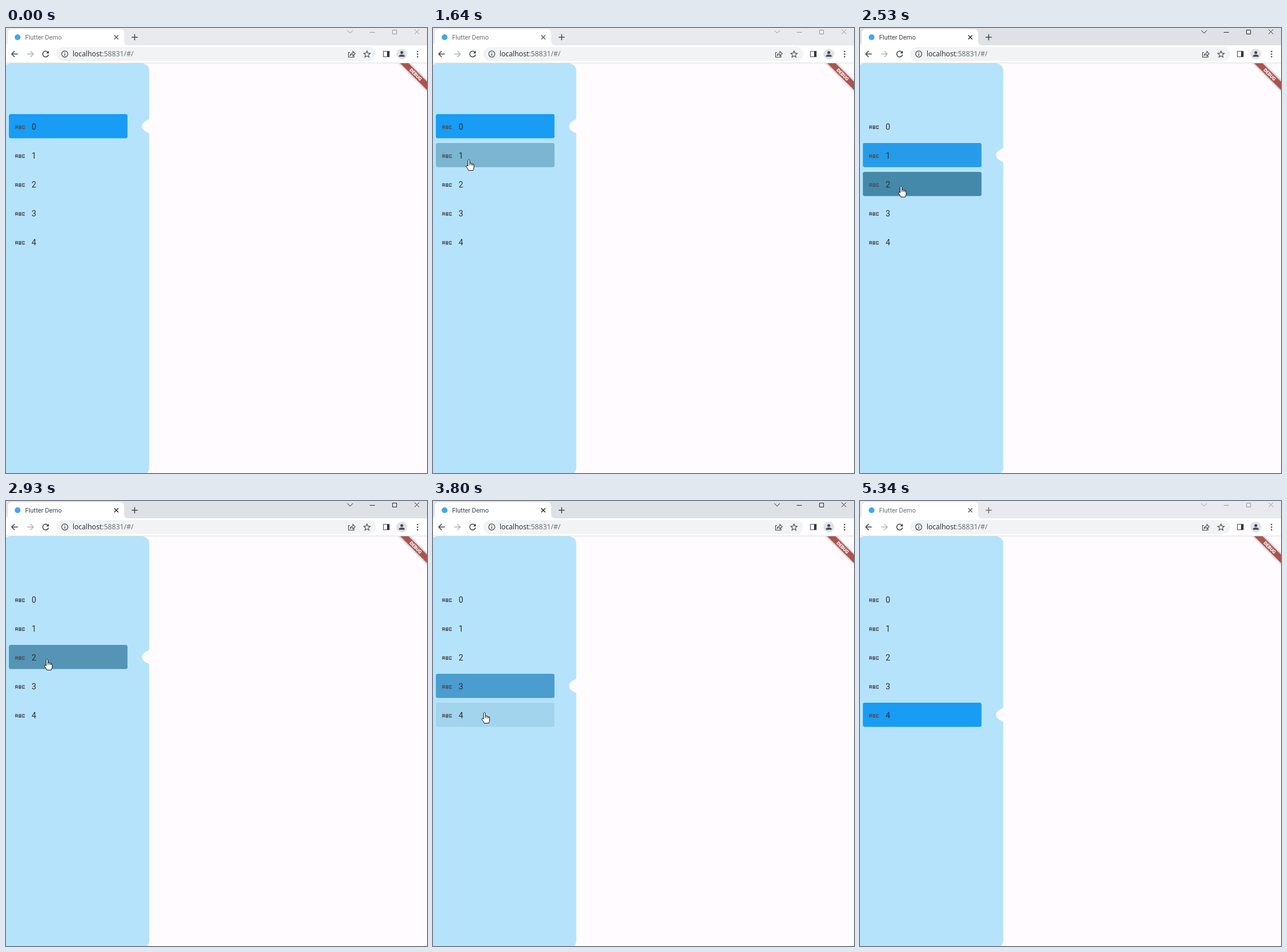
Animation of 727 by 770 pixels, one loop 5410 ms. Source, as an HTML page:

```html
<!DOCTYPE html>
<html lang="en">
<head>
<meta charset="utf-8">
<title>Sidebar demo</title>
<style>
  html, body { margin: 0; width: 100%; height: 100%; overflow: hidden; background: #fffbff; }
  svg { display: block; width: 727px; height: 770px; }
  .line { fill: none; stroke: #45494d; stroke-width: 1.5; }
  .title { font: 11px Roboto, sans-serif; }
  .url { font: 12.1px "Open Sans", sans-serif; fill: #62666b; }
  .digit { font: 14px Roboto, sans-serif; fill: #2c2c36; }
  .banner { font: 900 8.2px Roboto, sans-serif; fill: #fff; text-anchor: middle; }
</style>
</head>
<body>
<svg viewBox="0 0 727 770">
  <defs>
    <clipPath id="page"><rect y="61" width="727" height="709"/></clipPath>
    <filter id="shadow" x="-20%" y="-100%" width="140%" height="300%"><feGaussianBlur stdDeviation="2.2"/></filter>
    <g id="abc" fill="none" stroke="#50505a" stroke-width="1.35">
      <path d="M16.6 174.5V169.4H19.8V174.5M16.6 172.2H19.8"/>
      <path d="M22.6 169.4H25.8V174H22.6ZM22.6 171.8H25.8"/>
      <path d="M31.6 170.8V169.4H28.6V174H31.6V172.6"/>
    </g>
  </defs>

  <rect id="strip" width="727" height="31"/>
  <path d="M-4 30Q3 30 3 23V9Q3 2 10 2H197Q204 2 204 9V23Q204 30 211 30Z" fill="#fff"/>
  <circle cx="20" cy="16" r="5" fill="#42a5f5"/>
  <text id="title" class="title" x="33" y="20">Flutter Demo</text>
  <path id="tabClose" class="line" d="M187 12.5l7 7m0-7l-7 7"/>
  <path id="plus" class="line" d="M217 16h10.4M222.2 10.8v10.4"/>
  <path id="controls" class="line" style="stroke-width:1" d="M589.5 4.2l4.7 4.8 4.7-4.8M628 7.5h9M667.5 3.5h7v7h-7zM705.5 2.5l8 8m0-8l-8 8"/>

  <rect y="30" width="727" height="30" fill="#fff"/>
  <rect y="60" width="727" height="1" fill="#dcdde0"/>
  <rect x="87" y="33" width="552" height="24" rx="12" fill="#f1f3f4"/>
  <path class="line" d="M20.5 45H10M15 39.8L9.8 45L15 50.2"/>
  <path class="line" style="stroke:#bbb3b1" d="M36.5 45H47M42 39.8L47.2 45L42 50.2"/>
  <path class="line" d="M72.6 42.2A5 5 0 1 0 73.4 46"/>
  <path d="M74 39.2V44H69.2Z" fill="#45494d"/>
  <circle class="line" cx="101.5" cy="45" r="5.3" style="stroke-width:1.2"/>
  <path class="line" style="stroke-width:1.3" d="M101.5 44.3v3.8M101.5 41.7v1.4"/>
  <text class="url" x="115" y="49.4"><tspan fill="#222428">localhost</tspan>:58831/#/</text>
  <g class="line" style="stroke-width:1.1">
    <path d="M594 42.5h-2.5v8h9.5v-2.8M594.3 47.5q.5-4 4.7-4.3v-2.8l4 4-4 4v-2.7q-3 0-4.7 1.8z"/>
    <path d="M623.4 39.7l1.6 3.7 4 .4-3 2.7.9 4-3.5-2.1-3.5 2.1.9-4-3-2.7 4-.4z"/>
    <path d="M651.8 40.3h10v9.4h-10z"/>
  </g>
  <path d="M658 40h4v10h-4z" fill="#33373b"/>
  <circle cx="683.5" cy="45" r="9.3" fill="#dfe2e7"/>
  <circle cx="683.5" cy="42.5" r="2.5" fill="#444a55"/>
  <path d="M678.5 49.8v-1q0-2.7 5-2.7t5 2.7v1z" fill="#444a55"/>
  <path d="M710.7 40.7v9.1" fill="none" stroke="#45494d" stroke-width="2.6" stroke-linecap="round" stroke-dasharray="0 4.5"/>

  <g clip-path="url(#page)">
    <rect y="61" width="727" height="709" fill="#fffbff"/>
    <rect id="sidebar" x="-5" y="61" width="252.4" height="713" rx="13"/>
    <path id="notch" d="M248 156.5C246 160 235 161.5 235 170S246 180 248 183.5Z" fill="#fffbff"/>
    <g id="items"></g>
    <g transform="translate(707.5 80.5) rotate(45)">
      <rect x="-50" y="-4.9" width="100" height="9.8" opacity=".5" filter="url(#shadow)"/>
      <rect x="-50" y="-4.9" width="100" height="9.8" fill="#ac534d"/>
      <text class="banner" y="2.9">DEBUG</text>
    </g>
  </g>

  <g id="cursor" fill="#fff" stroke="#111" stroke-linejoin="round">
    <path id="arrow" d="M.5 .5V13.6L3.4 10.9L5.4 15.5L7.6 14.6L5.6 10H10Z"/>
    <path id="hand" d="M-1.7 11V2Q-.1-1 1.4 2V7Q3.6 6 4.2 7.6Q6 7 6.6 8.4Q8.8 8 8.8 10.4V14Q8.6 16 7.2 19.5H-.6Q-1 17.5-4.6 12.8Q-4.6 9.5-1.7 12ZM1.4 7V10.5M4.2 7.6V10.8M6.6 8.4V11"/>
  </g>
</svg>
<script>
const LOOP = 5410, FOCUS = 1920, BLUR = 5340;
const TOP = 149, PITCH = 50, HEIGHT = 41.8, LEFT = 5, WIDTH = 204.8;
const SIDE = [181, 227, 251], HOVER = [68, 136, 170], SPLASH = [98, 158, 188], BLUE = [24, 156, 244];

// The pointer visits tiles 1 to 4 in turn: arrives, presses, leaves for the next.
const visits = [
  { press: 1920, leave: 2370 },
  { press: 2790, leave: 3080 },
  { press: 3460, leave: 3735 },
  { press: 4260, leave: 4610 }
];
visits.forEach((visit, k) => {
  visit.arrive = k ? visits[k - 1].leave : 1540;
  visit.select = visit.press + 140;
  visit.rest = [62 + 9 * k, 227 + 46 * k];
});

const easeOut = u => 1 - (1 - u) ** 3;
const easeIn = u => u ** 3;
const ramp = (t, start, length) => Math.max(0, Math.min(1, (t - start) / length));
const mix = (a, b, u) => a.map((v, i) => v + (b[i] - v) * u);
const el = id => document.getElementById(id);

const ENTRY = [651, 686];
const moves = [
  { start: 110, length: 130, to: [582, 563], ease: easeOut },
  { start: 770, length: 1, to: [556, 539], ease: easeOut },
  { start: 910, length: 60, to: [569, 537], ease: easeOut },
  ...visits.map(({ arrive, rest }, k) => k
    ? { start: arrive - 60, length: 140, to: rest, ease: easeOut }
    : { start: 1240, length: 420, to: rest, ease: easeOut }),
  { start: 4540, length: 210, to: [712, 687], ease: easeIn }
];
const pointerAt = t => moves.reduce(
  (at, { start, length, to, ease }) => mix(at, to, ease(ramp(t, start, length))), ENTRY);

el("sidebar").style.fill = `rgb(${SIDE})`;
el("items").innerHTML = [0, 1, 2, 3, 4].map(i => `
  <g transform="translate(0 ${i * PITCH})">
    <rect class="tile" x="${LEFT}" y="${TOP}" width="${WIDTH}" height="${HEIGHT}" rx="3.2"/>
    <use href="#abc"/><text class="digit" x="44.2" y="175.8">${i}</text>
  </g>`).join("");
const tiles = document.querySelectorAll(".tile");

function tileColor(i, t) {
  if (i < visits.length && t >= visits[i].select) return SIDE;
  if (i === 0) return BLUE;
  const { arrive, press, leave } = visits[i - 1];
  const hovered = mix(SIDE, HOVER, ramp(t, arrive + 50, 100));
  const pressed = mix(hovered, SPLASH, ramp(t, press, 250));
  return mix(pressed, BLUE, ramp(t, leave, 200));
}

function draw(t) {
  const active = t >= FOCUS && t < BLUR;
  el("strip").style.fill = active ? "#dee1e6" : "#e8eaed";
  el("title").style.fill = active ? "#3c4043" : "#6b6e72";
  el("tabClose").style.stroke = active ? "#24302a" : "#5c6064";
  el("plus").style.stroke = t < BLUR ? "#45494d" : "#6b6f73";
  el("controls").style.stroke = active ? "#25282b" : "#96989b";

  const selected = visits.filter(visit => t >= visit.select).length;
  el("notch").setAttribute("transform", `translate(0 ${selected * PITCH})`);
  tiles.forEach((tile, i) => { tile.style.fill = `rgb(${tileColor(i, t).map(Math.round)})`; });

  const [x, y] = pointerAt(t).map(Math.round);
  const overTile = x > LEFT && x < LEFT + WIDTH && (y - TOP) % PITCH < HEIGHT;
  el("cursor").style.display = t < 110 || t >= 4820 ? "none" : "";
  el("cursor").setAttribute("transform", `translate(${x} ${y})`);
  el("arrow").style.display = overTile ? "none" : "";
  el("hand").style.display = overTile ? "" : "none";
}

const began = performance.now();
function tick() {
  draw((performance.now() - began) % LOOP);
  requestAnimationFrame(tick);
}
tick();
</script>
</body>
</html>
```
